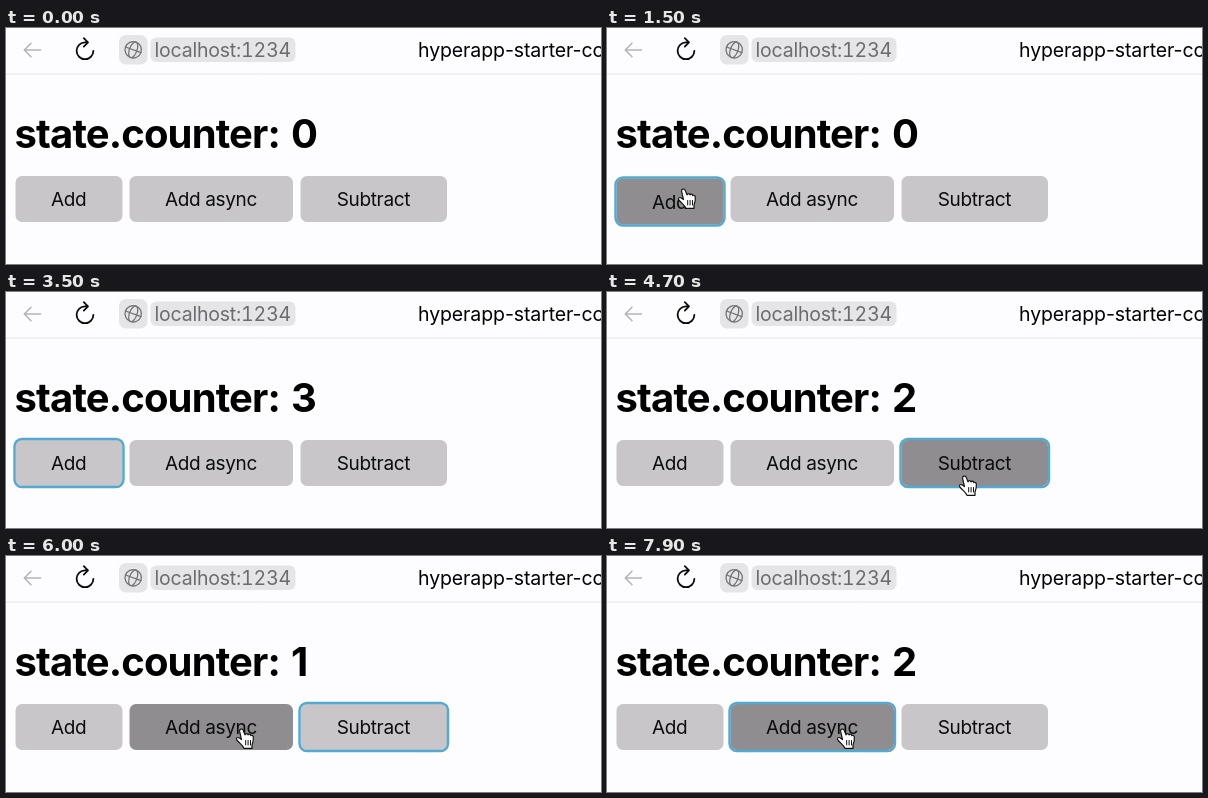
Recreate the animation shown at these times as an HTML page. Size 595x236 px, loop 8 s.

```html
<!DOCTYPE html>
<html lang="en">
<head>
<meta charset="utf-8">
<title>Counter</title>
<style>
  html, body { margin: 0; width: 100%; height: 100%; overflow: hidden; background: #fdfcfe; }
  svg { display: block; width: 595px; height: 236px; font-family: Inter, "Open Sans", sans-serif; }
  .title { font-size: 40px; font-weight: 700; letter-spacing: -.86px; }
  .label { font-size: 19px; letter-spacing: -.35px; text-anchor: middle; fill: #0c0c0d; }
  .address { font-size: 19.5px; letter-spacing: -.2px; font-variant-numeric: tabular-nums; fill: #6c6b6f; }
  .line { fill: none; stroke-linecap: round; stroke-linejoin: round; }
</style>
</head>
<body>
<svg viewBox="0 0 595 236">
  <rect width="595" height="236" fill="#fdfcfe"/>
  <path d="M0 46H595" stroke="#e6e5e8"/>

  <path class="line" d="M34.5 22H18.5M25 15.2L18.3 22L25 28.8" stroke="#b3b2b5" stroke-width="1.5"/>
  <path class="line" d="M87.4 22.8A8.4 8.4 0 1 1 79 14.4H81.5M77.8 10.2L82 14.4L77.8 18.6" stroke="#0c0c0d" stroke-width="1.8"/>

  <rect x="113" y="7" width="28.500" height="29.500" rx="7" fill="#e5e4e7"/>
  <g class="line" stroke="#747377" stroke-width="1.3" transform="translate(127.2 21.8) rotate(20)">
    <circle r="8.2"/>
    <ellipse rx="3.8" ry="8.2"/>
    <path d="M-8.2 0H8.2"/>
  </g>
  <rect x="144.500" y="9.500" width="145" height="24.500" rx="6" fill="#e5e4e7"/>
  <text class="address" x="148.500" y="29">localhost:1234</text>
  <text x="412" y="29" font-size="19.500" letter-spacing="-.1">hyperapp-starter-co</text>

  <text class="title" x="8.500" y="119.700">state.counter:</text>
  <text class="title" id="count" x="284.900" y="119.700">0</text>

  <g id="buttons"></g>

  <g id="arrow">
    <path d="M0 0V16.500L3.800 13L6.300 19L9 17.800L6.500 12H11.800Z" fill="#000" stroke="#fff" stroke-width="1.2"/>
  </g>
  <g id="hand">
    <path d="M-2.400 1.400C-2.800-1 .2-1.700 1-.1L3 4.900C3.300 3.300 5.500 3.100 6 4.900C6.500 3.700 8.500 3.900 8.800 5.600C9.700 4.800 11.200 5.500 11.300 7.100C11.600 10.800 11 13 10 15V18.300H2C1.200 15.600-2.600 13.200-5 10.200C-6.600 8.200-4.400 6.800-2.700 8L-.5 9.600Z"
      fill="#fff" stroke="#111" stroke-width="1.200" stroke-linejoin="round"/>
    <path class="line" d="M3.700 10.500V15M6.100 10.500V15M8.500 10.500V15" stroke="#111"/>
  </g>
</svg>
<script>
const LOOP = 8000, STEP = 100, TOP = 148, HEIGHT = 46;
const $ = id => document.getElementById(id);

const buttons = [
  { label: 'Add', x: 9.5, w: 107 },
  { label: 'Add async', x: 123.5, w: 163.5 },
  { label: 'Subtract', x: 294.5, w: 146.5 }
];

// [press, release, button]
const clicks = [
  [1500, 1600, 0], [2000, 2200, 0], [2800, 2900, 0],
  [4300, 4500, 2], [5200, 5400, 2],
  [6100, 6200, 1], [7600, 7800, 1]
];

// [time, value]
const counts = [[0, 0], [1600, 1], [2200, 2], [2900, 3], [4500, 2], [5400, 1], [7200, 2]];

// Visits of the pointer, as [time, x, y] stops
const visits = [
  [[900, 74, 208], [1200, 77, 162], [3100, 77, 162], [3400, 125, 218], [3500, 140, 240]],
  [[3800, 318, 215], [4100, 358, 185], [5500, 358, 185], [5900, 236, 174], [LOOP, 236, 174]]
];

function add(parent, tag, attrs) {
  const el = document.createElementNS('http://www.w3.org/2000/svg', tag);
  for (const key in attrs) el.setAttribute(key, attrs[key]);
  return parent.appendChild(el);
}

for (const b of buttons) {
  b.group = add($('buttons'), 'g', {});
  b.face = add(b.group, 'rect', { x: b.x, y: TOP, width: b.w, height: HEIGHT, rx: 6.5 });
  b.ring = add(b.group, 'rect', {
    x: b.x - 1, y: TOP - 1, width: b.w + 2, height: HEIGHT + 2, rx: 7.5,
    fill: 'none', stroke: '#53a9d0', 'stroke-width': 2.4
  });
  add(b.group, 'text', { class: 'label', x: b.x + b.w / 2 - 0.3, y: 178 }).textContent = b.label;
}

const ease = k => k * k * (3 - 2 * k);

function pointerAt(t) {
  const stops = visits.find(v => t >= v[0][0] && t < v[v.length - 1][0]);
  if (!stops) return null;
  const i = stops.findIndex(s => s[0] > t);
  const [t0, x0, y0] = stops[i - 1], [t1, x1, y1] = stops[i];
  const k = ease((t - t0) / (t1 - t0));
  return { x: x0 + (x1 - x0) * k, y: y0 + (y1 - y0) * k };
}

function render(t) {
  const p = pointerAt(t);
  const last = clicks.filter(c => c[0] <= t).pop();
  const hover = p && buttons.find(b =>
    p.x >= b.x && p.x <= b.x + b.w && p.y >= TOP && p.y <= TOP + HEIGHT);

  $('count').textContent = counts.filter(c => c[0] <= t).pop()[1];

  buttons.forEach((b, i) => {
    const focused = last && last[2] === i;
    const pressed = focused && t < last[1];
    b.group.setAttribute('transform', `translate(0 ${pressed ? 2.5 : 0})`);
    b.face.setAttribute('fill', b === hover ? '#8f8d90' : '#c8c6c9');
    b.ring.setAttribute('visibility', focused ? 'visible' : 'hidden');
  });

  for (const [id, shown] of [['hand', hover], ['arrow', p && !hover]]) {
    $(id).setAttribute('visibility', shown ? 'visible' : 'hidden');
    if (p) $(id).setAttribute('transform', `translate(${p.x} ${p.y})`);
  }
}

const start = performance.now();
function tick() {
  const t = (performance.now() - start) % LOOP;
  render(Math.floor(t / STEP) * STEP);
  requestAnimationFrame(tick);
}
tick();
</script>
</body>
</html>
```
